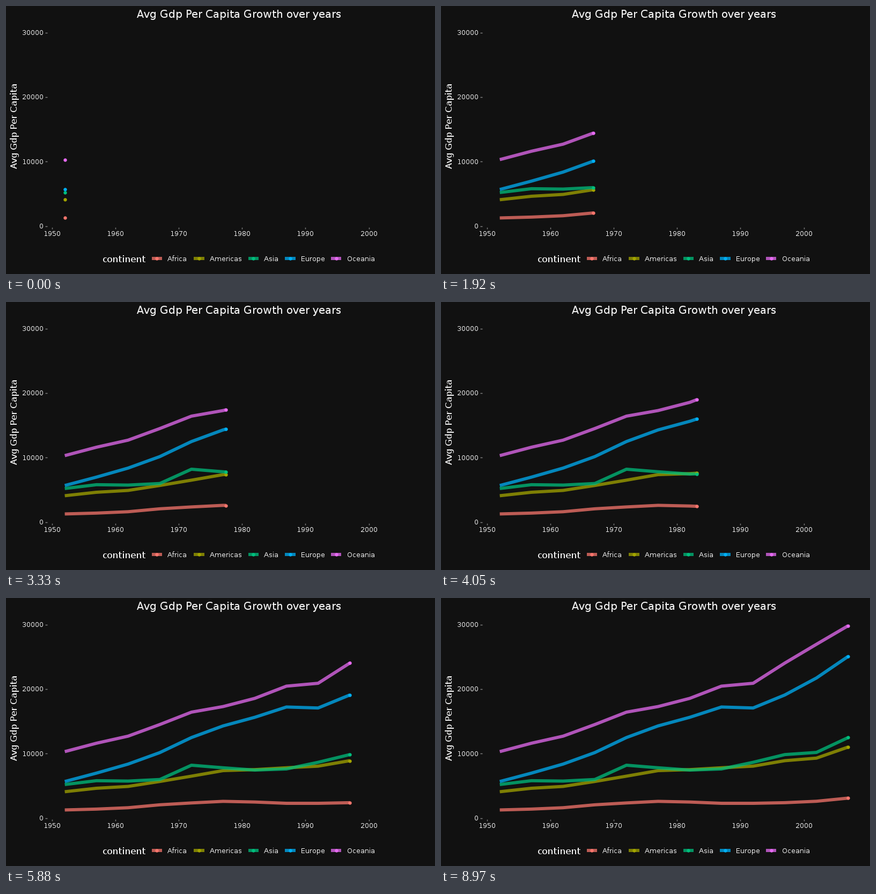
Recreate the animation shown at these times as a matplotlib script. Size 800 by 500 pixels, loop 9 s.

```python
import numpy as np
import matplotlib.pyplot as plt
from matplotlib.animation import FuncAnimation

plt.rcParams.update({
    "font.family": "DejaVu Sans",
    "text.hinting": "native",
    "text.hinting_factor": 1,
})

FRAMES, REVEAL = 300, 239   # the reveal is followed by a still pause
PX = 0.72                   # points per pixel at 100 dpi
BG, INK, TICK = "#111111", "#f2f2f2", "#7f7f7f"

YEARS = np.arange(1952, 2008, 5)
# name: (colour, legend key centre, mean GDP per capita)
SERIES = {
    "Africa": ("#F8766D", 281.4, [
        1252.6, 1385.2, 1598.1, 2050.4, 2339.6, 2585.9,
        2481.6, 2282.7, 2281.8, 2378.8, 2599.4, 3089.0]),
    "Americas": ("#A3A500", 360.0, [
        4079.1, 4616.0, 4901.5, 5668.3, 6491.3, 7352.0,
        7506.7, 7793.4, 8044.9, 8889.3, 9287.7, 11003.0]),
    "Asia": ("#00BF7D", 461.4, [
        5195.5, 5787.7, 5729.4, 5971.2, 8187.5, 7791.3,
        7434.1, 7608.2, 8639.7, 9834.1, 10174.1, 12473.0]),
    "Europe": ("#00B0F6", 530.0, [
        5661.1, 6963.0, 8365.5, 10143.8, 12479.6, 14284.0,
        15617.9, 17214.3, 17061.6, 19076.8, 21711.7, 25054.5]),
    "Oceania": ("#E76BF3", 615.8, [
        10298.1, 11598.5, 12696.5, 14495.0, 16417.3, 17284.0,
        18554.7, 20448.0, 20894.0, 24024.2, 26938.8, 29810.2]),
}


def px_x(year):
    return 86.0 + (np.asarray(year) - 1950) * 11.81


def px_y(gdp):
    return 410.5 - np.asarray(gdp) * 0.012033


fig = plt.figure(figsize=(8, 5), dpi=100, facecolor=BG)
ax = fig.add_axes([0, 0, 1, 1])
ax.set(xlim=(0, 800), ylim=(500, 0))
ax.axis("off")


def label(x, y, text, size, **kw):
    ax.text(x, y, text, fontsize=size * PX, color=INK,
            va="baseline", rotation_mode="anchor", **kw)


def stroke(x, y, color):
    return ax.plot(x, y, color=color, alpha=0.75, lw=5.93 * PX, zorder=2,
                   solid_capstyle="butt", solid_joinstyle="round")[0]


def dot(x, y, color):
    return ax.scatter([x], [y], s=(6.4 * PX) ** 2, color=color,
                      linewidths=0, zorder=3)


def tick(x, y):
    ax.plot(x, y, color=TICK, lw=1.48 * PX, solid_capstyle="butt")


# Axes and titles
for gdp in range(0, 30001, 10000):
    y = float(px_y(gdp))
    tick([73.3, 77.1], [y, y])
    label(70.4, y + 4.5, str(gdp), 13, ha="right")
for year in range(1950, 2001, 10):
    x = float(px_x(year))
    tick([x, x], [412.6, 416.4])
    label(x, 429, str(year), 13, ha="center")
label(434.5, 22, "Avg Gdp Per Capita Growth over years", 20, ha="center")
label(21, 223.3, "Avg Gdp Per Capita", 17, ha="center", rotation=90)

# Legend
label(179.6, 478, "continent", 17, ha="left")
for name, (color, cx, _) in SERIES.items():
    stroke([cx - 9.6, cx + 9.6], [471.3, 471.3], color)
    dot(cx, 471.3, color)
    label(cx + 19.8, 476, name, 13, ha="left")

# Each survey year lands on a whole frame
keys = np.round((YEARS - 1952) / 55 * REVEAL)
key_x = px_x(YEARS)
tracks = [(stroke([], [], color), dot(0, 0, color), px_y(values))
          for color, _, values in SERIES.values()]


def update(frame):
    now = min(frame, REVEAL)
    past = keys < now
    x = np.interp(now, keys, key_x)
    artists = []
    for line, head, key_y in tracks:
        y = np.interp(now, keys, key_y)
        line.set_data(np.append(key_x[past], x), np.append(key_y[past], y))
        head.set_offsets([[x, y]])
        artists += [line, head]
    return artists


anim = FuncAnimation(fig, update, frames=FRAMES, interval=30,
                     repeat=True, repeat_delay=0, blit=False)
plt.show()
```
